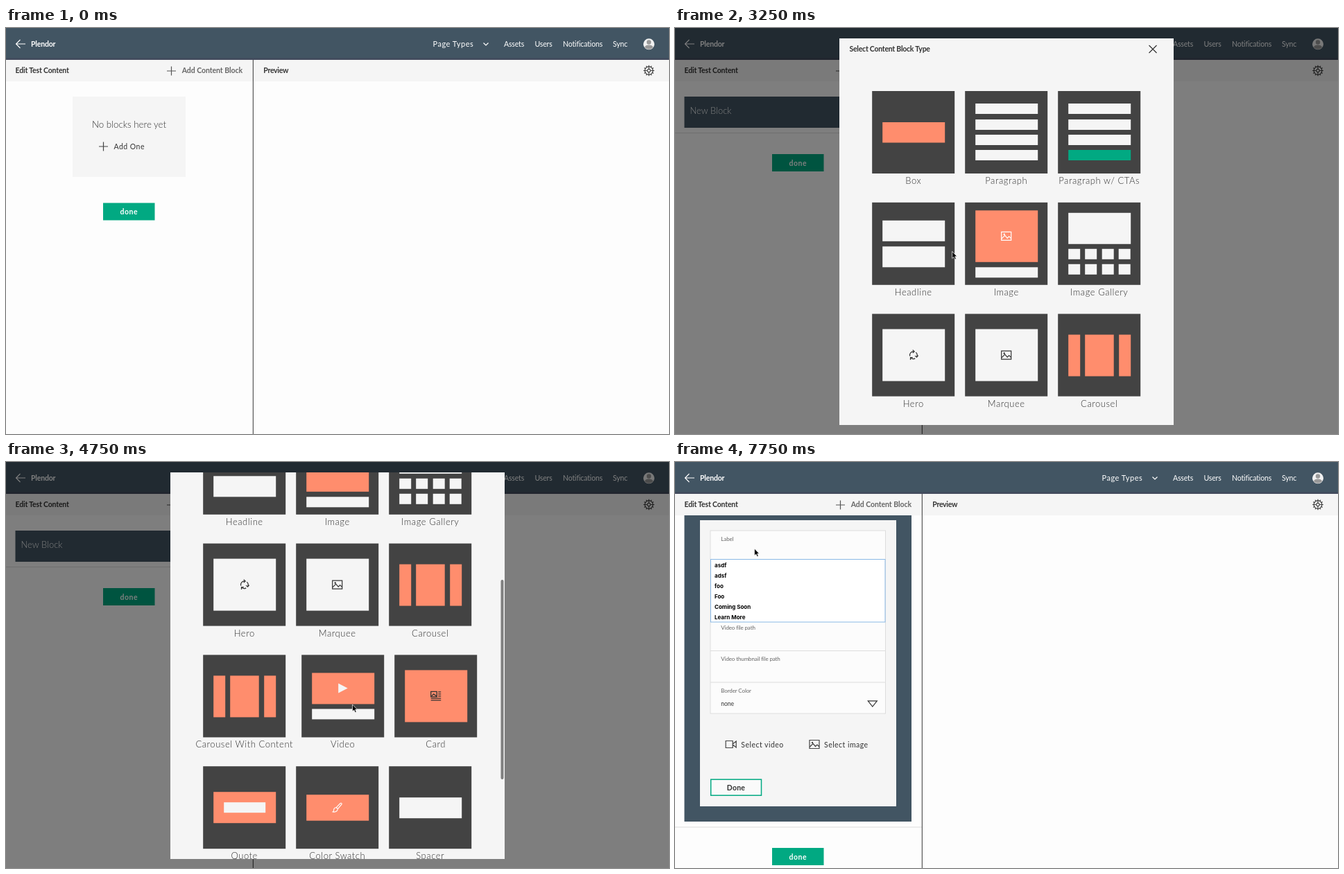
Write an HTML page that moves like this. It is 956 px wide and 586 px high and loops after 8 s.

```html
<!DOCTYPE html>
<html lang="en">
<head>
<meta charset="utf-8">
<title>Content block editor</title>
<style>
html, body { margin: 0; height: 100%; overflow: hidden; background: #fdfdfd; }
#stage { display: block; width: 100vw; height: 100vh; }
text { font: 10.5px Lato, sans-serif; fill: #333; white-space: pre; }
.bold { font-weight: 700; letter-spacing: -.18px; }
.nav { letter-spacing: -.15px; fill: #fff; }
.wide { letter-spacing: .47px; }
.light { font-size: 13px; font-weight: 300; }
.tile { letter-spacing: .55px; }
.field { font-size: 8px; letter-spacing: -.12px; fill: #666; }
.option { font: 700 8px Inter, sans-serif; fill: #000; }
.mid { text-anchor: middle; }
</style>
</head>
<body>
<svg id="stage" viewBox="0 0 956 586"></svg>
<script>
const SLATE = '#425563', GREEN = '#01a982', ORANGE = '#ff8d6d', DARK = '#434343', PALE = '#f5f5f5';
const LOOP = 8000, STEP = 250;

const rect = (x, y, w, h, fill, more = '') =>
  `<rect x="${x}" y="${y}" width="${w}" height="${h}" fill="${fill}" ${more}/>`;
const text = (x, y, s, cls, more = '') => `<text x="${x}" y="${y}" class="${cls}" ${more}>${s}</text>`;
const line = (d, color, w = 1.2) => `<path d="${d}" fill="none" stroke="${color}" stroke-width="${w}"/>`;
const dot = (x, y, r, fill) => `<circle cx="${x}" cy="${y}" r="${r}" fill="${fill}"/>`;
const move = (x, y, s) => `<g transform="translate(${x} ${y})">${s}</g>`;
const plus = (x, y, color, w) => line(`M${x - 6.5} ${y}h13M${x} ${y - 6.5}v13`, color, w);
const thumb = (x, y, h) => rect(x, y, 4, h, '#7f7f7f', 'rx="2"');
const doneButton = y => rect(140, y, 74.5, 25, GREEN) +
  text(177.3, y + 16.5, 'done', 'bold mid', 'style="fill:#fff;letter-spacing:.5px"');

// Linear keyframes: rows of [time, value, value, ...]
function track(t, keys) {
  const i = keys.findIndex(k => k[0] > t);
  if (i < 0) return keys.at(-1).slice(1);
  if (!i) return keys[0].slice(1);
  const a = keys[i - 1], b = keys[i], p = (t - a[0]) / (b[0] - a[0]);
  return a.slice(1).map((v, j) => v + (b[j + 1] - v) * p);
}

const CURSOR = [
  [500, 199, 187], [1500, 160, 176.5], [2750, 160, 176.5], [3500, 519.5, 395.5], [4250, 519.5, 395.5],
  [4750, 499.5, 350], [5250, 499.5, 350], [6250, 132, 483], [6500, 132, 483], [7500, 114.5, 125]
];
const MODAL_SCROLL = [[3250, 0], [3500, 60], [3750, 150], [4000, 215], [4250, 262], [4500, 295]];
const PANEL_SCROLL = [[6000, 0], [6250, 10], [6500, 38], [6750, 58], [7000, 67.5]];

// Icons, each centred on 0,0
const picture = c => line('M-7-6H7V6H-7ZM-7 4L-2-1 1.5 3 4 .5 7 3.5', c) + dot(-3, -2.6, 1.2, c);
const camera = (c, w) => line('M-7.5-5H2.5V5H-7.5ZM2.5-.5L7.5-4.5V4.5L2.5 .5', c, w);
const cycle = line('M-5 1.5A5.3 5.3 0 0 1 1-5.2M3.5-4A5.3 5.3 0 0 1 4.8 2.5M2.5 4.8A5.3 5.3 0 0 1-4 3.7' +
  'M-1-7.5L1.5-5.2-1-3M7 .5L4.8 3 2.3 1M-4.2 7V3.5H-.8', '#333');
const article = line('M-7-6.5H1.5V1H-7ZM-6 0L-3-3 1 0M3.5-6H7.5M3.5-3H7.5M3.5 0H7.5M-7 3.2H7.5M-7 6H7.5', '#333', 1.3);
const brush = line('M-1.5 0L4.5-6.2Q6.5-7 6.5-5L.8 2ZM-1.5 0Q-5 .2-5 3.5-5.2 5.5-6.5 6.2-.5 7.5 .8 2', '#fff', 1.1);

function gear(x, y) {
  let teeth = '';
  for (let a = 0; a < 12; a++) teeth += `<path d="M0-5.5V-7.8" transform="rotate(${a * 30})"/>`;
  return move(x, y, `<g fill="none" stroke="#444" stroke-width="1.2">${teeth}
    <circle r="5.8"/><circle r="2.2"/><path d="M0-5.8V-2.2M0 5.8V2.2M-5.8 0H-2.2M5.8 0H2.2"/></g>`);
}

const bar = (y, h, fill = PALE) => rect(15, y, 90, h, fill);
const lines = last => bar(18, 15) + bar(41, 15) + bar(63, 15) + bar(85, 15, last);
const slides = rect(15, 30, 17, 60, ORANGE) + rect(39, 30, 41.5, 60, ORANGE) + rect(88, 30, 17, 60, ORANGE);
const gallery = bar(15, 45) + [67, 89].map(y =>
  [15, 39, 63.5, 87.5].map(x => rect(x, y, 17, 15, PALE)).join('')).join('');

const TILES = [
  ['Box', bar(45, 29.5, ORANGE)],
  ['Paragraph', lines(PALE)],
  ['Paragraph w/ CTAs', lines(GREEN)],
  ['Headline', bar(26, 30) + bar(63.5, 30)],
  ['Image', bar(11.5, 74.5, ORANGE) + bar(93.5, 15) + move(59.5, 48.5, picture('#fff'))],
  ['Image Gallery', gallery],
  ['Hero', bar(22, 75) + move(59.5, 59.5, cycle)],
  ['Marquee', bar(22, 75) + move(59.5, 59.5, picture('#333'))],
  ['Carousel', slides],
  ['Carousel With Content', slides],
  ['Video', bar(26, 45, ORANGE) + bar(78, 15) + `<path d="M53 41L66.5 48 53 55Z" fill="${PALE}"/>`],
  ['Card', bar(22, 75, ORANGE) + move(59.5, 59.5, article)],
  ['Quote', bar(37, 45, ORANGE) + rect(30, 52, 60, 15, PALE)],
  ['Color Swatch', bar(41, 37.5, ORANGE) + move(59.5, 59.5, brush)],
  ['Spacer', bar(45, 30)]
];

function tile([name, art], i) {
  const shift = i === 10 || i === 11 ? 8 : 0;
  return move(284.2 + i % 3 * 134 + shift, 91 + Math.floor(i / 3) * 160.8,
    rect(0, 0, 119, 119, DARK) + art + text(59.5, 134, name, 'light tile mid'));
}

function modal(scroll) {
  return rect(0, 0, 956, 586, '#000', 'opacity=".5"') +
    '<svg x="237" y="15" width="482" height="558" viewBox="237 15 482 558">' + rect(237, 15, 482, 558, PALE) +
    move(0, -scroll, text(251.5, 34.3, 'Select Content Block Type', 'bold', 'style="letter-spacing:-.25px"') +
      line('M683.5 25L694.5 36M694.5 25L683.5 36', '#333') + TILES.map(tile).join('')) +
    (scroll ? thumb(713.5, 15.5 + scroll * .524, 288) : '') + '</svg>';
}

function emptyPanel(hover) {
  return rect(96, 99, 163, 116, PALE) + text(177.5, 144.3, 'No blocks here yet', 'light mid', 'style="font-size:13.3px"') +
    plus(140.5, 171, hover ? '#000' : '#444', hover ? 1.7 : 1.2) +
    text(155.5, 174.8, 'Add One', 'wide') + doneButton(252.5);
}

const newBlock = rect(13.5, 99, 327.5, 45, SLATE) + text(21.5, 123.5, 'New Block', 'light', 'style="fill:#fff"') +
  rect(0, 151, 356, 1, '#ddd') + doneButton(182);

const options = () => rect(51.5, 198, 251.5, 90.5, '#fff', 'stroke="#8ab9e6"') +
  ['asdf', 'adsf', 'foo', 'Foo', 'Coming Soon', 'Learn More']
    .map((s, i) => text(57, 209.8 + i * 14.95, s, 'option')).join('');

function videoForm(caret, hover, open) {
  const labels = [['Label', 171.5], ['Caption', 217], ['Video file path', 299.3],
    ['Video thumbnail file path', 344.8], ['Border Color', 390]];
  return rect(13.5, 89.5, 327.5, 487, SLATE) + text(21.5, 113.8, 'Video', 'light', 'style="fill:#fff"') +
    [313.7, 318.7, 323.7].map(x => dot(x, 112, 1.6, '#fff')).join('') +
    rect(36, 141.5, 283, 413, PALE) + rect(51, 156.5, 252.5, 264, '#fcfcfc', 'stroke="#ddd"') +
    line('M51 202.2H303.5M51 284.7H303.5M51 330H303.5M51 375.5H303.5', '#ddd', 1) +
    labels.map(([s, y]) => text(66.3, y, s, 'field')).join('') +
    (caret ? rect(66.3, 181.5, 1, 11, '#333') : '') +
    text(66.3, 409.3, 'none', 'field', 'style="font-size:8.6px;fill:#333"') +
    line('M278.3 402.3H291.3L284.8 410.5Z', '#333') +
    move(80.7, 465, camera(hover ? '#000' : '#444', hover ? 1.6 : 1.2)) + text(95.3, 469, 'Select video', 'wide') +
    move(201, 465, picture('#444')) + text(215, 469, 'Select image', 'wide') +
    rect(51.7, 515.7, 72.8, 23, '#fafafa', `stroke="${GREEN}" stroke-width="1.5"`) +
    text(88, 531, 'Done', 'bold mid', 'style="letter-spacing:.25px"') +
    rect(0, 584, 356, 1, '#ddd') + doneButton(614.5) + (open ? options() : '');
}

const chrome = rect(0, 46, 956, 31, PALE) + rect(0, 0, 956, 46, SLATE) + rect(0, 43.5, 956, 2.5, '#434b5d') +
  line('M28 23H14.5M20.5 17L14.5 23 20.5 29', '#fff', 1.1) +
  text(36, 26.5, 'Plendor', 'bold', 'style="fill:#fff"') +
  text(615.5, 27, 'Page Types', 'nav', 'style="font-size:11px;letter-spacing:.5px"') +
  line('M688.5 21.5L692 25 695.5 21.5', '#fff') +
  [['Assets', 718], ['Users', 762.5], ['Notifications', 803], ['Sync', 875]]
    .map(([s, x]) => text(x, 27, s, 'nav')).join('') +
  dot(927, 23.3, 8, '#f1f1f1') + dot(927, 20.5, 3.2, '#999') +
  '<path d="M920.8 28Q922 24.6 927 24.6T933.2 28Q927 33.5 920.8 28Z" fill="#999"/>' +
  text(13.5, 65.3, 'Edit Test Content', 'bold') + plus(238.5, 62, '#555') +
  text(253.7, 65, 'Add Content Block', 'bold', 'style="fill:#666;letter-spacing:-.05px"') +
  text(371.3, 65.3, 'Preview', 'bold', 'style="letter-spacing:-.28px"') + gear(927, 61.5) +
  rect(355.8, 46, 1.1, 540, '#484848');

function pointer(t) {
  const [x, y] = track(t, CURSOR);
  return move(x, y, '<path d="M0 0V10L2.3 8 4 11.6 5.7 10.8 4.1 7.3H7Z" fill="#000" stroke="#fff" stroke-width=".7"/>');
}

function scene(t) {
  const [down] = track(t, PANEL_SCROLL);
  const picking = t >= 2250 && t < 5250, editing = t >= 5250;
  const panel = editing
    ? move(0, 10 - down, videoForm(t % 1000 < 500, t >= 6000 && t < 6750, t >= 7750))
    : picking ? newBlock : emptyPanel(t >= 750);
  return rect(0, 0, 956, 586, '#fdfdfd') + panel + chrome +
    (t >= 6250 && t < 7500 ? thumb(350.3, 46.5 + down * .85, 450) : '') +
    (picking ? modal(track(t, MODAL_SCROLL)[0]) : '') + (t >= 500 ? pointer(t) : '');
}

const stage = document.getElementById('stage'), start = performance.now();
let shown = -1;
function tick() {
  const t = Math.floor((performance.now() - start) % LOOP / STEP) * STEP;
  if (t !== shown) stage.innerHTML = scene(shown = t);
  requestAnimationFrame(tick);
}
tick();
</script>
</body>
</html>
```
